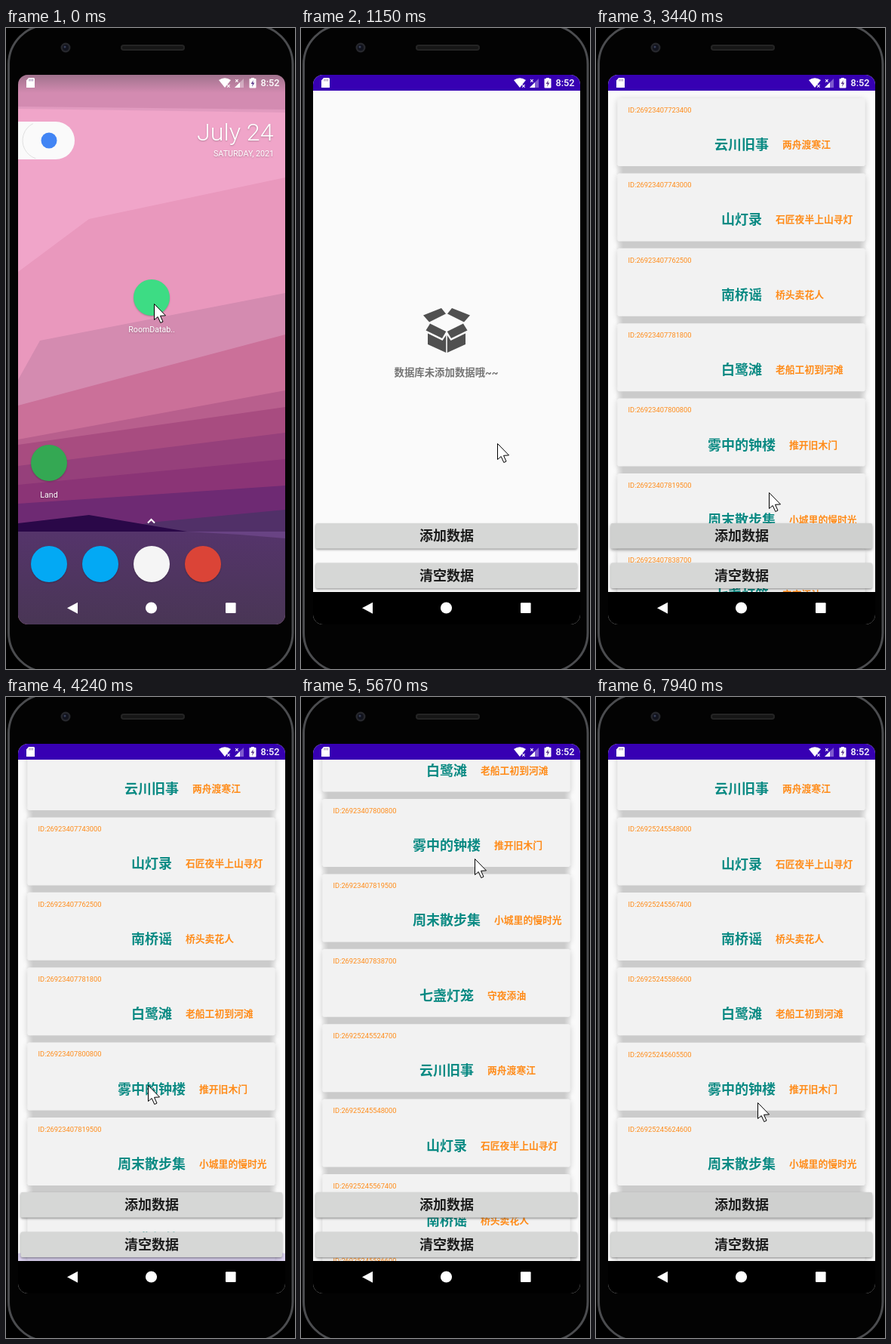
Animation of 383x849 px, one loop 8 s. Source, as an HTML page with a canvas:

```html
<!DOCTYPE html>
<html lang="zh">
<head>
<meta charset="utf-8">
<title>Room list demo</title>
<style>
html, body { margin: 0; width: 100%; height: 100%; overflow: hidden; background: #000; }
canvas { display: block; width: 383px; height: 849px; }
</style>
</head>
<body>
<canvas id="stage" width="383" height="849"></canvas>
<script>
const ctx = document.getElementById('stage').getContext('2d');
const LOOP = 8000;
const FONT = 'Roboto, "Noto Sans CJK SC", "Noto Sans CJK", sans-serif';

// Turning points of the pointer: [step, x, y]
const POINTER = [
  [-2, 196, 365], [-1, 201, 371], [2, 208, 379], [6, 260, 550], [8, 200, 319], [10, 88, 500],
  [13, 174, 400], [15, 216, 486], [19, 241, 668], [23, 235, 669], [25, 223, 561], [30, 188, 514],
  [31, 205, 251], [34, 218, 668], [37, 218, 668], [39, 159, 605], [41, 230, 214], [43, 215, 600],
  [46, 199, 524], [47, 205, 329], [50, 222, 641], [55, 216, 673], [57, 160, 530], [58, 214, 537]
];

const BOOKS = [['云川旧事', '两舟渡寒江'], ['山灯录', '石匠夜半上山寻灯'], ['南桥谣', '桥头卖花人'],
  ['白鹭滩', '老船工初到河滩'], ['雾中的钟楼', '推开旧木门'], ['周末散步集', '小城里的慢时光'],
  ['七盏灯笼', '守夜添油']];
const IDS = [['26923407', [723400, 743000, 762500, 781800, 800800, 819500, 838700]],
  ['26925245', [524700, 548000, 567400, 586600, 605500, 624600, 643700]]];

// Wallpaper ridges: colour, left y, right y, optional knee
const RIDGES = [
  ['#e19abf', 104, 108], ['#f0a5c9', 107, 112],
  ['#e998bd', 323, 198, 110, 253], ['#d48bb0', 466, 351, 45, 414],
  ['#cb7099', 500, 406, 200, 451], ['#b85f8d', 545, 480], ['#a84c80', 552, 502],
  ['#96407b', 580, 536], ['#8b3476', 605, 571], ['#6e2a73', 630, 606],
  ['#513068', 700, 638, 190, 655], ['#2a0848', 656, 689, 110, 645]
];

const lerp = (a, b, p) => a + (b - a) * p;
const ramp = (n, a, b) => Math.min(1, Math.max(0, (n - a) / (b - a)));
const easeOut = (p, k) => 1 - (1 - p) ** k;
const pulse = (n, peak, len) => n < peak ? 0 : Math.max(0, 1 - (n - peak) / len);

// The picture advances in steps that start at 122 ms and slowly lengthen.
const stepAt = t => Math.floor((Math.sqrt(122 ** 2 + 0.48 * (t - 410)) - 122) / 0.24);

function pointerAt(n) {
  const i = POINTER.findIndex(k => k[0] >= n);
  if (i < 1) return POINTER[0].slice(1);
  const [n0, x0, y0] = POINTER[i - 1], [n1, x1, y1] = POINTER[i];
  const p = ramp(n, n0, n1);
  return [lerp(x0, x1, p), lerp(y0, y1, p)];
}

// Short drag, long drag, then a fling to the end
const scrollAt = n => 33 * ramp(n, 26, 29) + 322.6 * ramp(n, 39, 41)
  + 373.1 * easeOut(ramp(n, 41, 46), 1.6);

function rect(x, y, w, h, fill) {
  ctx.fillStyle = fill;
  ctx.fillRect(x, y, w, h);
}

function round(x, y, w, h, r, fill) {
  ctx.beginPath();
  ctx.roundRect(x, y, w, h, r);
  ctx.fillStyle = fill;
  ctx.fill();
}

function disc(x, y, r, fill) {
  ctx.beginPath();
  ctx.arc(x, y, r, 0, Math.PI * 2);
  ctx.fillStyle = fill;
  ctx.fill();
}

function poly(pts, fill) {
  ctx.beginPath();
  for (let i = 0; i < pts.length; i += 2) ctx.lineTo(pts[i], pts[i + 1]);
  ctx.closePath();
  ctx.fillStyle = fill;
  ctx.fill();
}

function text(str, x, y, size, fill, align = 'left', weight = 400) {
  ctx.font = `${weight} ${size}px ${FONT}`;
  ctx.textAlign = align;
  ctx.fillStyle = fill;
  ctx.fillText(str, x, y);
}

function shadow(color, blur, dy) {
  ctx.shadowColor = color;
  ctx.shadowBlur = blur;
  ctx.shadowOffsetY = dy;
}

function gradient(x0, y0, x1, y1, ...stops) {
  const g = ctx.createLinearGradient(x0, y0, x1, y1);
  for (const [at, color] of stops) g.addColorStop(at, color);
  return g;
}

function phone() {
  rect(0, 0, 383, 849, '#000');
  ctx.beginPath();
  ctx.roundRect(3.5, -4, 376.5, 857, 52);
  ctx.fillStyle = '#030303';
  ctx.fill();
  ctx.lineWidth = 3;
  ctx.strokeStyle = '#4b4c4f';
  ctx.stroke();
  disc(79, 26, 6.5, '#26272c');
  disc(79, 26, 4, '#11131d');
  disc(78, 25, 1.5, '#39405a');
  round(152, 22, 85, 8, 4, '#242424');
  round(154, 24, 81, 4, 2, '#161616');
}

function home() {
  rect(16, 62, 354, 728, '#d38bb1');
  for (const [color, left, right, ...knee] of RIDGES) {
    poly([16, left, ...knee, 370, right, 370, 667, 16, 667], color);
  }
  rect(16, 62, 354, 24, gradient(0, 62, 0, 86, [0, 'rgba(90,80,90,.42)'], [1, 'rgba(90,80,90,0)']));
  rect(16, 667, 354, 123, gradient(0, 667, 0, 790, [0, '#55346b'], [1, '#493655']));
  poly([240, 667, 370, 667, 370, 676, 310, 671], '#694384');

  round(16, 124, 75, 50, [0, 25, 25, 0], '#fafafa');
  ctx.beginPath();
  ctx.arc(47, 149, 25, Math.PI * 0.6, Math.PI * 1.35);
  ctx.strokeStyle = '#d8d8d8';
  ctx.lineWidth = 0.8;
  ctx.stroke();
  disc(57, 149, 10.5, '#4285f4');

  shadow('rgba(0,0,0,.25)', 2, 1);
  text('July 24', 354.5, 149, 32.2, '#fff', 'right', 300);
  text('SATURDAY, 2021', 355, 170, 10.7, '#fff', 'right');
  text('RoomDatab..', 193, 402.5, 10.6, '#fff', 'center');
  text('Land', 57, 622, 10.6, '#fff', 'center');
  disc(193, 357, 24, '#3ddc84');
  disc(57, 576, 24, '#34a853');
  ['#03a9f4', '#03a9f4', '#f5f5f5', '#db4437'].forEach((c, i) => disc(57 + 68 * i, 710, 24, c));
  shadow('transparent', 0, 0);

  ctx.beginPath();
  ctx.moveTo(188, 655.5);
  ctx.lineTo(192.5, 651);
  ctx.lineTo(197, 655.5);
  ctx.strokeStyle = '#fff';
  ctx.lineWidth = 2;
  ctx.stroke();
}

function statusIcons() {
  const w = '#fff', dim = 'rgba(255,255,255,.35)';
  poly([30, 66, 37, 66, 38, 67, 38, 79, 27, 79, 27, 69.5], w);
  for (let i = 0; i < 3; i++) rect(30.5 + 2.2 * i, 67.5, 1, 3, 'rgba(80,40,120,.6)');
  ctx.beginPath();
  ctx.moveTo(290, 79);
  ctx.lineTo(282, 69);
  ctx.quadraticCurveTo(290, 63.5, 298, 69);
  ctx.closePath();
  ctx.fillStyle = w;
  ctx.fill();
  text('×', 295, 79.5, 9, w, 'center', 700);
  poly([303, 79, 315, 67, 315, 79], dim);
  poly([303, 79, 310, 72, 310, 79], w);
  text('×', 306, 72.5, 9, w, 'center', 700);
  rect(325, 66, 4, 2, w);
  round(322.5, 67, 9, 12.5, 1, w);
  poly([327.8, 69, 324.6, 74, 326.8, 74, 326, 78, 329.4, 72.6, 327.2, 72.6], '#5d3b8c');
  text('8:52', 362.5, 77, 12.7, w, 'right', 500);
}

function navIcons() {
  poly([81, 768.3, 95, 760.8, 95, 775.8], '#fff');
  disc(192.5, 768, 7.6, '#fff');
  round(291, 761.2, 13.6, 13.8, 1, '#fff');
}

// Open carton: one half of it, then its mirror image
function carton() {
  for (const side of [-1, 1]) {
    ctx.save();
    ctx.translate(193, 371);
    ctx.scale(side, 1);
    poly([7, 0, 31, 9.5, 23, 18.5, 1, 7.5], '#505050');
    poly([22, 20.5, 0.7, 31, 6, 40, 27.5, 29.5], '#505050');
    poly([25, 33.5, 5.5, 43, 0.8, 36, 0.8, 59, 25, 48], '#505050');
    ctx.restore();
  }
}

function list(scroll, count) {
  const top = i => 93 - scroll + 99.4 * i;
  const seen = [];
  for (let i = 0; i < count; i++) if (top(i) > -20 && top(i) < 760) seen.push(i);

  shadow('rgba(0,0,0,.2)', 9, 2);
  for (const i of seen) round(28.5, top(i), 328, 90, 2.5, '#f2f2f2');
  shadow('transparent', 0, 0);
  const clear = 'rgba(203,203,203,0)', gray = '#cbcbcb';
  const gap = gradient(26, 0, 359, 0, [0, clear], [0.03, gray], [0.97, gray], [1, clear]);
  for (const i of seen) if (i < count - 1) rect(26, top(i) + 88, 333, 13, gap);
  for (const i of seen) {
    const y = top(i), [title, note] = BOOKS[i % 7], [head, tails] = IDS[i / 7 | 0];
    round(28.5, y, 328, 90, 2.5, '#f2f2f2');
    text('ID:' + head + tails[i % 7], 42.5, y + 18.8, 9.3, '#ff8c1a');
    text(title, 193, y + 68, 18, '#0a8a83', 'center', 700);
    text(note, 193 + title.length * 9 + 18, y + 66, 12.8, '#ff8c1a', 'left', 700);
  }
}

function button(y, label, press) {
  shadow('rgba(0,0,0,.38)', 3 + press * 30, 1.5 + press * 20);
  round(19.5, y, 346.5, 33.5, 2, '#d6d7d6');
  shadow('transparent', 0, 0);
  if (press) round(19.5, y, 346.5, 33.5, 2, `rgba(0,0,0,${press})`);
  text(label, 193, y + 23.2, 18, '#1b1b1b', 'center', 700);
}

function edgeGlow(a) {
  ctx.beginPath();
  ctx.moveTo(16, 747);
  ctx.lineTo(16, 737);
  ctx.quadraticCurveTo(193, 705, 370, 737);
  ctx.lineTo(370, 747);
  ctx.fillStyle = `rgba(55,0,179,${a})`;
  ctx.fill();
}

function app(n, p) {
  const show = ramp(n, 22, 24);
  const glow = 0.16 * (pulse(n, 30, 4) + pulse(n, 46, 4));
  const press = 0.09 * (pulse(n, 22, 3) + pulse(n, 35, 3) + pulse(n, 54, 6));
  ctx.save();
  const half = lerp(24, 177, Math.min(1, p * 1.5));
  const y0 = lerp(318, 62, p), y1 = lerp(400, 790, p);
  ctx.beginPath();
  ctx.rect(193 - half, y0, half * 2, y1 - y0);
  ctx.clip();
  rect(16, 62, 354, 728, '#fafafa');

  // The window slides up and fades in while it is uncovered.
  ctx.save();
  ctx.translate(0, 38 * (1 - p));
  ctx.globalAlpha = p * (1 - show);
  carton();
  text('数据库未添加数据哦~~', 192.5, 460.5, 13.4, '#757575', 'center', 700);
  ctx.globalAlpha = p * show;
  if (show > 0) list(scrollAt(n), n < 35 ? 7 : 14);
  ctx.globalAlpha = p;
  edgeGlow(glow);
  button(656, '添加数据', press);
  button(708.5, '清空数据', 0);
  ctx.restore();

  rect(16, 62, 354, 21, '#3700b3');
  if (p > 0.9) rect(16, 747, 354, 43, '#000');
  ctx.restore();
}

function pointer(x, y) {
  ctx.save();
  ctx.translate(Math.round(x) + 0.5, Math.round(y) + 0.5);
  poly([0, 0, 0, 21, 4.7, 17, 8.3, 25, 11.5, 23.5, 8, 15.8, 15, 15.4], '#fff');
  ctx.strokeStyle = '#000';
  ctx.lineWidth = 1;
  ctx.stroke();
  ctx.restore();
}

function draw(time) {
  const n = stepAt(time), p = easeOut(ramp(n, 0, 4), 1.8);
  phone();
  ctx.save();
  ctx.beginPath();
  ctx.roundRect(16, 62, 354, 728, 13);
  ctx.clip();
  if (p < 1) home();
  if (p > 0) app(n, p);
  statusIcons();
  navIcons();
  ctx.restore();
  pointer(...pointerAt(n));
}

const begin = performance.now();
function loop() {
  draw((performance.now() - begin) % LOOP);
  requestAnimationFrame(loop);
}
loop();
</script>
</body>
</html>
```
